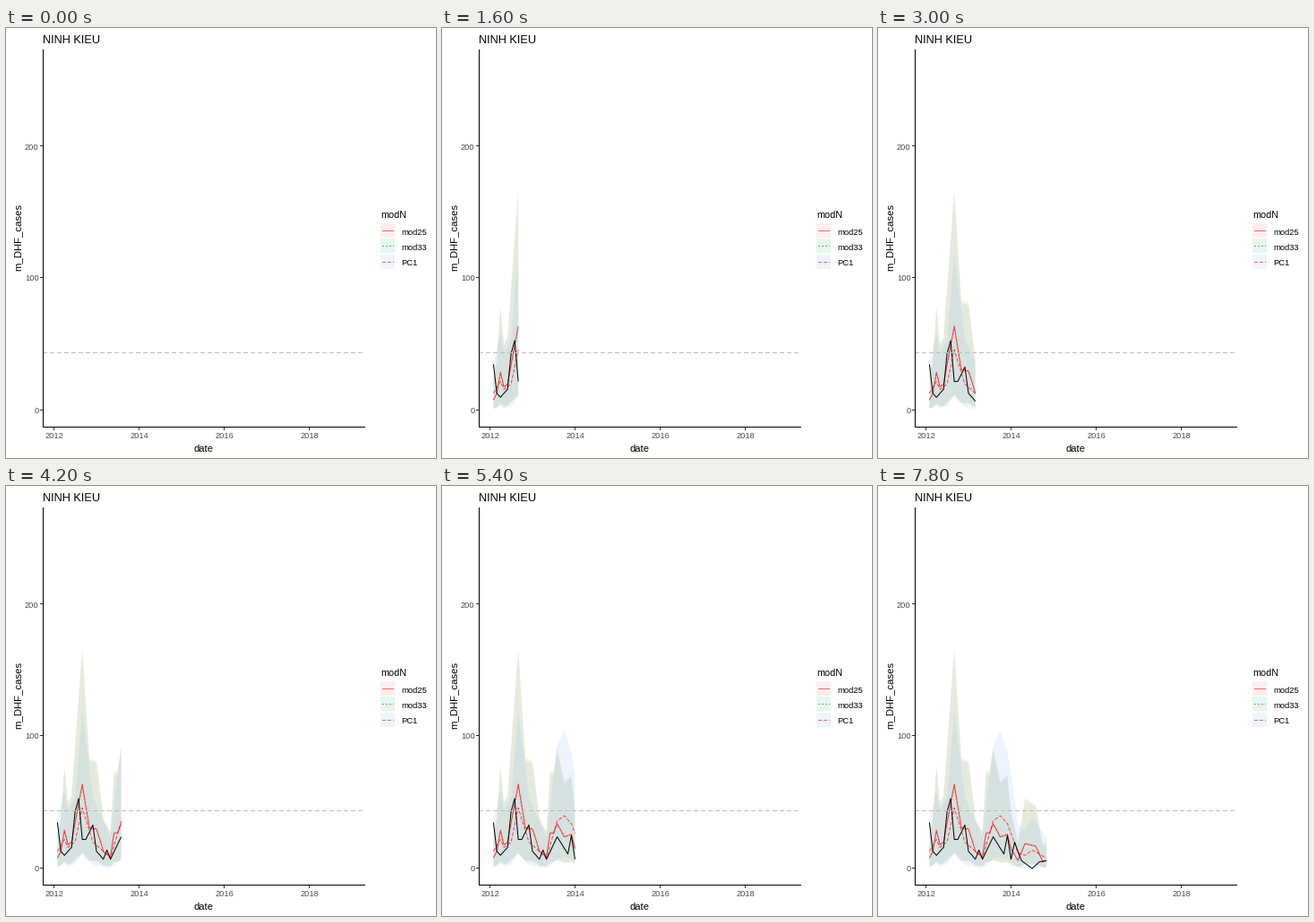
These frames come from a looping animation (480x480 px, 8 s). A matplotlib script:

```python
import numpy as np
import matplotlib.pyplot as plt
from matplotlib.animation import FuncAnimation
from matplotlib.patches import Polygon, Rectangle

SIZE, DPI = 480, 96
PT = 72 / DPI                      # points per pixel
FRAMES, STEP_MS = 40, 200
DAYS_PER_FRAME = 2526 / 99

plt.rcParams["font.family"] = "Liberation Sans"

# Monthly dates, February 2012 to November 2014
months = np.arange("2012-02", "2014-12", dtype="datetime64[M]")
days = (months.astype("datetime64[D]") - np.datetime64("2012-01-01")).astype(float)
keys = np.round((days - days[0]) / DAYS_PER_FRAME)


def series(turns):
    """Monthly values running straight between turning points."""
    return np.interp(np.arange(len(days)), list(turns), list(turns.values()))


cases = series({0: 35, 1: 13, 2: 10, 4: 16, 5: 43, 6: 53, 7: 22, 8: 22,
                10: 33, 11: 13, 13: 7, 14: 14, 15: 7, 18: 24, 21: 11,
                22: 25, 23: 7, 24: 20, 26: 6, 29: 0, 31: 5, 33: 6})
mod25 = series({0: 8, 1: 13, 2: 29, 3: 18, 4: 20, 7: 64, 9: 31, 11: 30,
                13: 13, 15: 9, 16: 27, 17: 27, 18: 34, 20: 24, 22: 26,
                23: 15, 25: 6, 27: 19, 30: 17, 32: 5, 33: 6})
pc1 = series({0: 13, 2: 22, 3: 16, 5: 20, 7: 46, 10: 20, 15: 8, 18: 36,
              20: 40, 22: 34, 25: 12, 27: 10, 29: 14, 33: 8})
mod33 = mod25 * 0.96 + 0.4


def px(day):
    return 53.4 + day * 0.13005


def py(value):
    return 427 - value * 1.474


fig = plt.figure(figsize=(SIZE / DPI, SIZE / DPI), dpi=DPI, facecolor="white")
ax = fig.add_axes([0, 0, 1, 1])
ax.set_xlim(0, SIZE)
ax.set_ylim(SIZE, 0)
ax.axis("off")


def line(xs, ys, color, z, **kw):
    return ax.plot(xs, ys, color=color, lw=PT, snap=False, zorder=z,
                   solid_capstyle="butt", dash_capstyle="butt", **kw)[0]


def box(x, y, w, h, color):
    ax.add_patch(Rectangle((x, y), w, h, fc=color, lw=0,
                           antialiased=False, zorder=6))


def label(x, y, text, size, color="black", ha="left", **kw):
    ax.text(x, y, text, fontsize=size * PT, color=color, ha=ha,
            va="baseline", **kw)


# Axes
box(41, 24, 1, 422, "black")
box(41, 445, 360, 1, "black")
for value, y in ((0, 427), (100, 279), (200, 132)):
    box(38, y - 1, 3, 1, "#333333")
    label(36.5, y + 3.5, str(value), 9.3, "#4d4d4d", "right")
for i in range(4):
    x = 53 + 95 * i
    box(x, 446, 1, 3, "#333333")
    label(x + 0.5, 458.5, str(2012 + 2 * i), 9.3, "#4d4d4d", "center")
label(41, 17, "NINH KIEU", 12.8)
label(220.5, 473, "date", 11.3, ha="center")
label(16, 271, "m_DHF_cases", 11.4, rotation=90, rotation_mode="anchor")
line([41, 401], [362.5, 362.5], "#bebebe", 5, dashes=(5, 3))

# Legend
SOLID, SHORT, LONG = {}, {"dashes": (2, 2)}, {"dashes": (4, 2)}
label(418, 212, "modN", 10.7)
legend = (("mod25", "#feeeec", "#ff6666", SOLID),
          ("mod33", "#e5f8eb", "#8a9a88", SHORT),
          ("PC1", "#eff5ff", "#e8667a", LONG))
for i, (name, fill, stroke, dash) in enumerate(legend):
    y = 218 + 17.28 * i
    box(418, round(y), 16, 16, fill)
    mid = int(y + 8.6) + 0.5
    line([420, 433], [mid, mid], stroke, 7, **dash)
    label(441, 231 + 17 * i, name, 9.4)

# Growing ribbons and lines
ribbons = []
for low, high, color in (
        (mod25 * 0.18, mod25 * 2.55 + 5, "#f8766d"),
        (mod25 * 0.19, mod25 * 2.5 + 4.5, "#00ba38"),
        (np.maximum(pc1 * 0.3 - 3, 0.5), pc1 * 2.5 + 4, "#619cff")):
    patch = Polygon([[0, 0], [0, 0]], fc=color, alpha=0.1, lw=0, zorder=2)
    ax.add_patch(patch)
    ribbons.append((patch, low, high))

curves = [(line([], [], (1, 0, 0, 0.7), 3, **SOLID), mod25),
          (line([], [], (1, 0, 0, 0.3), 3, **SHORT), mod33),
          (line([], [], (1, 0, 0, 0.7), 3, **LONG), pc1),
          (line([], [], "black", 4), cases)]


def update(frame):
    end = np.interp(frame, keys, days)
    t = np.append(days[days < end], end)
    xs = px(t)
    for patch, low, high in ribbons:
        top = py(np.interp(t, days, high))
        bottom = py(np.interp(t, days, low))
        patch.set_xy(np.column_stack([np.append(xs, xs[::-1]),
                                      np.append(top, bottom[::-1])]))
        patch.set_visible(frame > 0)
    for curve, values in curves:
        curve.set_data(xs, py(np.interp(t, days, values)))
        curve.set_visible(frame > 0)
    return [r[0] for r in ribbons] + [c[0] for c in curves]


anim = FuncAnimation(fig, update, frames=FRAMES, interval=STEP_MS,
                     init_func=lambda: update(0), repeat=True,
                     repeat_delay=0, blit=False)
plt.show()
```
